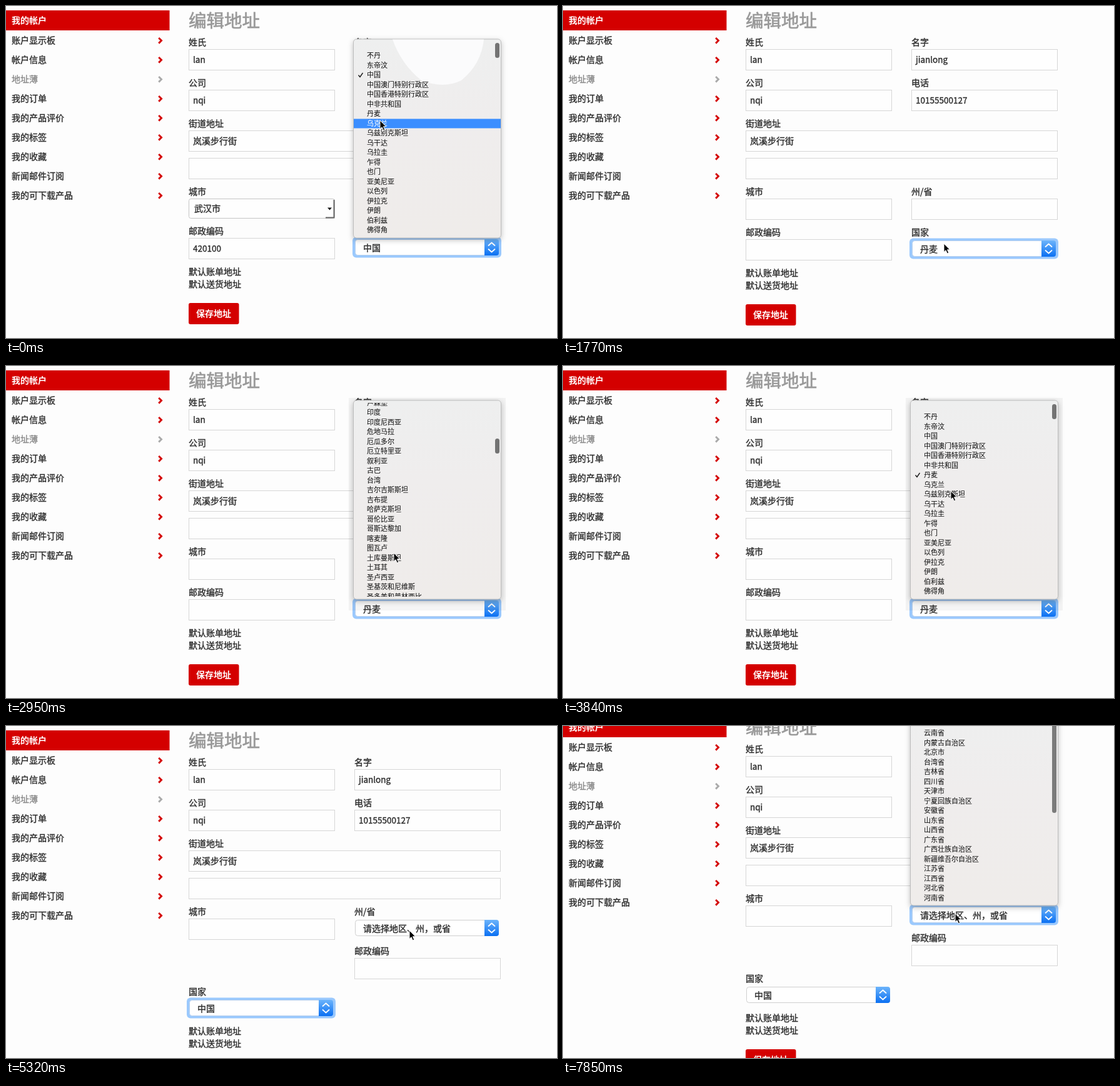
These frames come from a looping animation (881x531 px, 7990 ms). An HTML page:

```html
<!DOCTYPE html>
<html lang="zh-CN">
<head>
<meta charset="utf-8">
<title>编辑地址</title>
<style>
  html, body { margin: 0; width: 100%; height: 100%; overflow: hidden; background: #fdfdfd; }
  svg { display: block; }
  text { font-family: "Noto Sans CJK SC", "Noto Sans CJK", "Noto Sans", sans-serif; white-space: pre; }
  .panel { filter: drop-shadow(0 3px 4px rgba(0, 0, 0, .25)); }
</style>
</head>
<body>
<svg width="881" height="531" viewBox="0 0 881 531">
  <defs>
    <linearGradient id="blue" x2="0" y2="1">
      <stop stop-color="#6cb4fb"/><stop offset="1" stop-color="#0b70f2"/>
    </linearGradient>
    <linearGradient id="glass" x2="0" y2="1">
      <stop stop-color="#eeefef"/><stop offset=".4" stop-color="#efeded"/><stop offset="1" stop-color="#efecea"/>
    </linearGradient>
    <clipPath id="rows"><rect x="556" y="4" width="235" height="310"/></clipPath>
  </defs>
  <g id="stage"></g>
</svg>
<script>
const LOOP = 7990, RED = '#d40000', INK = '#2b2b2b', ROW = 15.5;
const CHINA = 0, DENMARK = 1, REGIONS = 2;

const NAV = '账户显示板 帐户信息 地址薄 我的订单 我的产品评价 我的标签 我的收藏 新闻邮件订阅 我的可下载产品'.split(' ');
const COUNTRIES = ('不丹 东帝汶 中国 中国澳门特别行政区 中国香港特别行政区 中非共和国 丹麦 乌克兰 乌兹别克斯坦 ' +
  '乌干达 乌拉圭 乍得 也门 亚美尼亚 以色列 伊拉克 伊朗 伯利兹 佛得角 俄罗斯 保加利亚 克罗地亚 关岛 冈比亚 冰岛 ' +
  '几内亚 几内亚比绍 列支敦士登 刚果(布) 刚果(金) 利比亚 利比里亚 加拿大 加纳 加蓬 匈牙利 北马里亚纳群岛 ' +
  '南乔治亚岛和南桑德威奇群岛 南极洲 南非 博茨瓦纳 卡塔尔 卢旺达 卢森堡 印度 印度尼西亚 危地马拉 厄瓜多尔 ' +
  '厄立特里亚 叙利亚 古巴 台湾 吉尔吉斯斯坦 吉布提 哈萨克斯坦 哥伦比亚 哥斯达黎加 喀麦隆 图瓦卢 土库曼斯坦 ' +
  '土耳其 圣卢西亚 圣基茨和尼维斯 圣多美和普林西比').split(' ');
const PROVINCES = ('云南省 内蒙古自治区 北京市 台湾省 吉林省 四川省 天津市 宁夏回族自治区 安徽省 山东省 山西省 ' +
  '广东省 广西壮族自治区 新疆维吾尔自治区 江苏省 江西省 河北省 河南省').split(' ');

// Each step changes only the listed fields of the one before it.
const STEPS = [
  { t: 0, form: CHINA, page: 0, x: 598, y: 183, open: 1, hot: 7, list: 0, beam: 0, tip: 0 },
  { t: 150, y: 180 },
  { t: 290, y: 176, hot: 6 },
  { t: 880, hot: -1 },
  { t: 1030, form: DENMARK, open: 0 },
  { t: 1180, y: 200 },
  { t: 1330, x: 601, y: 260 },
  { t: 1480, x: 605, y: 330 },
  { t: 1620, x: 608, y: 370 },
  { t: 1770, x: 609, y: 380 },
  { t: 1920, open: 1, hot: 6 },
  { t: 2210, x: 615, y: 345, hot: 17 },
  { t: 2360, x: 620, y: 299, hot: 14 },
  { t: 2800, list: 400, hot: -1 },
  { t: 2950, list: 689 },
  { t: 3250, y: 250, hot: 55 },
  { t: 3400, y: 200, hot: 52 },
  { t: 3690, list: 280, hot: -1 },
  { t: 3840, list: 0 },
  { t: 4130, y: 198, hot: 8 },
  { t: 4280, y: 186, hot: 7 },
  { t: 4430, y: 170, hot: 6 },
  { t: 4570, y: 147, hot: 4 },
  { t: 4720, y: 130, hot: 3 },
  { t: 4870, y: 115, hot: 2 },
  { t: 5020, y: 112 },
  { t: 5170, hot: -1 },
  { t: 5320, form: REGIONS, open: 0, x: 645, y: 327 },
  { t: 5470, x: 640, y: 333 },
  { t: 5620, x: 627, y: 346 },
  { t: 5760, x: 610, y: 360 },
  { t: 5910, x: 596, y: 372, beam: 1 },
  { t: 6060, x: 588, y: 376 },
  { t: 6210, x: 586, y: 377 },
  { t: 6660, page: 8, tip: 1 },
  { t: 6810, page: 16 },
  { t: 6960, page: 21 },
  { t: 7110, x: 600, y: 352, tip: 0 },
  { t: 7250, x: 618, y: 322, beam: 0 },
  { t: 7400, x: 627, y: 300 },
  { t: 7550, open: 1 }
];
for (let i = 1; i < STEPS.length; i++) STEPS[i] = { ...STEPS[i - 1], ...STEPS[i] };

const rect = (x, y, w, h, fill, more = '') =>
  `<rect x="${x}" y="${y}" width="${w}" height="${h}" fill="${fill}" ${more}/>`;
const line = (d, color, width, more = '') =>
  `<path d="${d}" fill="none" stroke="${color}" stroke-width="${width}" ${more}/>`;
const group = (x, y, body) => `<g transform="translate(${x} ${y})">${body}</g>`;

// Text is placed by its left edge and vertical centre.
const label = (s, x, cy, { size = 14, color = INK, weight = 400, heavy = .35 } = {}) =>
  `<text x="${x}" y="${cy + size * .37}" font-size="${size}" font-weight="${weight}" fill="${color}"` +
  ` stroke="${color}" stroke-width="${heavy}">${s}</text>`;

const field = (x, y, w = 234, value = '', size = 13.5) =>
  rect(x + .5, y + .5, w - 1, 33, '#fefefe', 'stroke="#d6d6d6"') + label(value, x + 7, y + 17, { size });

function select(x, cy, value, focus) {
  const ring = focus ? rect(x - 3, cy - 16.5, 238, 33, '#9bc9fd', 'rx="6"') : '';
  return ring +
    rect(x + 1.5, cy - 12.5, 229, 25, '#fff', `rx="4" stroke="${focus ? '#b5cfee' : '#cfcfcf'}"`) +
    `<path d="M${x + 208} ${cy - 13}h19q4 0 4 4v18q0 4-4 4h-19z" fill="url(#blue)"/>` +
    line(`M${x + 214.5} ${cy - 3}l5-4.5 5 4.5m-10 6l5 4.5 5-4.5`, '#fff', 1.8, 'stroke-linecap="round" stroke-linejoin="round"') +
    label(value, x + 14, cy + 1);
}

function citySelect() {
  return rect(292.5, 308.5, 233, 31, '#fefefe', 'rx="3" stroke="#c4c4c4"') +
    line('M524.5 310V338.5H511', '#666', 2) +
    '<path d="M514 322.500h7l-3.500 4z" fill="#111"/>' + label('武汉市', 301, 324);
}

function sidebar() {
  const items = NAV.map((name, i) => {
    const cy = 55 + 31 * i, off = name === '地址薄';
    return label(name, 9, cy, { color: off ? '#8a8a8a' : INK }) +
      line(`M244.200 ${cy - 4}l4.300 4.300-4.300 4.300`, off ? '#aaa' : RED, 2.9);
  });
  return rect(0, 7, 261.5, 32, RED) + label('我的帐户', 9, 23, { color: '#fff', weight: 700, heavy: 0 }) + items.join('');
}

function footer(y) {
  return label('默认账单地址', 292, y) + label('默认送货地址', 292, y + 20) +
    rect(292, y + 50, 80.5, 34, RED, 'rx="3"') +
    label('保存地址', 304, y + 67, { color: '#fff', weight: 700, heavy: 0 });
}

function address({ form, open }) {
  const top = label('编辑地址', 292, 23, { size: 28.5, color: '#999', heavy: .7 }) +
    label('姓氏', 292, 58) + field(292, 69, 234, 'lan') +
    label('名字', 557, 58) + field(557, 69, 234, 'jianlong') +
    label('公司', 292, 123) + field(292, 134, 234, 'nqi') +
    label('电话', 557, 123) + field(557, 134, 234, '10155500127') +
    label('街道地址', 292, 188) + field(292, 199, 499, '岚溪步行街', 14) + field(292, 243, 499) +
    label('城市', 292, 297) + label('州/省', 557, 297);
  if (form === REGIONS) {
    return top + field(292, 308) + select(557, 323, '请选择地区、州，或省', open) +
      label('邮政编码', 557, 360) + field(557, 371) +
      label('国家', 292, 425) + select(292, 451, '中国', !open) + footer(488);
  }
  const china = form === CHINA, y = china ? 360 : 362;
  return top + (china ? citySelect() : field(292, 308)) + field(557, 308) +
    label('邮政编码', 292, y) + field(292, y + 11, 234, china ? '420100' : '') +
    label('国家', 557, y) + select(557, y + 26, china ? '中国' : '丹麦', true) + footer(y + 65);
}

function menu({ form, hot, list, page }) {
  const regions = form === REGIONS;
  const top = regions ? -10 - page : form === CHINA ? 53 : 55;
  const names = regions ? PROVINCES : COUNTRIES;
  const checked = regions ? -1 : form === CHINA ? 2 : 6;
  const first = regions ? 42 : 26;
  const rows = names.map((name, i) => {
    const cy = first + i * ROW - list, on = i === hot, color = on ? '#fff' : '#1c1c1c';
    if (cy < -8 || cy > 326) return '';
    return (on ? rect(556, cy - 7, 235, 15, '#3b8eff') : '') +
      (i === checked ? line(`M563.500 ${cy + .5}l2.500 3 4.500-6.500`, color, 1.4) : '') +
      label(name, 577, cy, { size: 11, color, heavy: .1 });
  }).join('');
  const halo = form === DENMARK ? rect(548, -4, 251, 340, '#000', 'opacity=".04"') : '';
  const shine = form === CHINA ? '<path d="M618 .5H764Q760 40 728 66Q700 80 664 66Q632 40 618 .5z" fill="#fbfbfc"/>' : '';
  const thumb = regions ? rect(782, 5, 7, 165, '#7b7b7b', 'rx="3.5"')
    : rect(782, 6 + list * .08, 7, 24, '#737373', 'rx="3.5"');
  return group(0, top, halo +
    rect(555.5, 0, 236, 318, 'url(#glass)', 'rx="5" stroke="#bdbdbd" class="panel"') + shine +
    `<g clip-path="url(#rows)">${rows}</g>` + thumb);
}

function pointer({ x, y, beam }) {
  return group(x, y, beam
    ? line('M-3-7Q0-7 0-5Q0-7 3-7M0-5V5M-3 7Q0 7 0 5Q0 7 3 7M-1.500 2h3', '#222', 1.2)
    : '<path d="M0 0V13.500L3.100 10.700 5.300 15.800 7.700 14.800 5.500 9.800H9.700z" fill="#000" stroke="#fff"/>');
}

const tooltip = () => rect(586.5, 394.5, 51, 21, '#faf3ef', 'rx="1.5" stroke="#cfcac7"') +
  label('邮政编码', 590, 405, { size: 11, heavy: .1 });

const draw = s => group(0, -s.page, sidebar() + address(s)) +
  (s.open ? menu(s) : '') + (s.tip ? tooltip() : '') + pointer(s);

const stage = document.getElementById('stage');
const start = performance.now();
let shown;
function tick() {
  const t = (performance.now() - start) % LOOP;
  const step = STEPS.findLast(s => s.t <= t) || STEPS[0];
  if (step !== shown) stage.innerHTML = draw(shown = step);
  requestAnimationFrame(tick);
}
tick();
</script>
</body>
</html>
```
